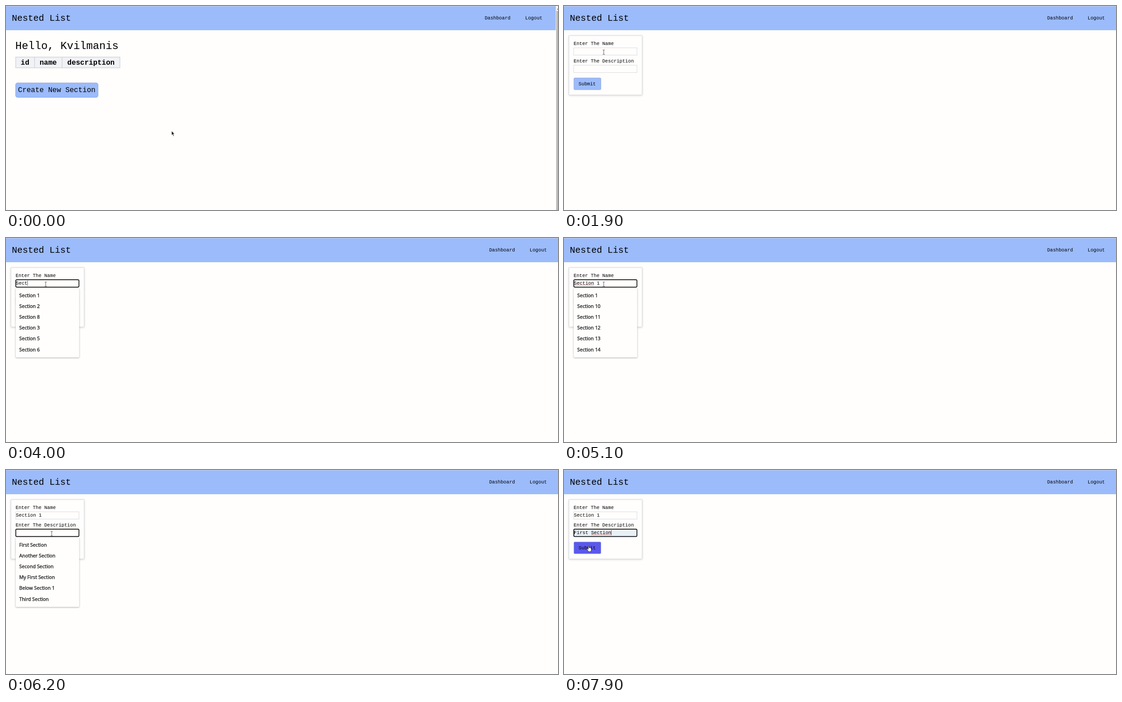
Recreate the animation shown at these times as an HTML page. Size 1232 by 455 pixels, loop 8000 ms.

```html
<!DOCTYPE html>
<html lang="en">
<head>
<meta charset="utf-8">
<title>Nested List</title>
<style>
  html, body { margin: 0; width: 100%; height: 100%; overflow: hidden; background: #fffefd; }
  svg { display: block; width: 100%; height: 100%; }
  text { white-space: pre; }
  .mono { font-family: "Liberation Mono", monospace; }
  .arial { font-family: "Liberation Sans", sans-serif; }
  .ui { font-family: "Noto Sans", sans-serif; }
  .item { font-size: 10.75px; fill: #1c1c1c; stroke: #1c1c1c; stroke-width: .32px; }
  .card { filter: drop-shadow(0 1.3px 2px rgba(0, 0, 0, .16)); }
  .popup { filter: drop-shadow(0 1px 1.4px rgba(0, 0, 0, .34)); }
  .tip { filter: drop-shadow(0 2px 3px rgba(0, 0, 0, .35)); }
</style>
</head>
<body>
<svg id="stage" viewBox="0 0 1232 455"></svg>
<script>
const LOOP = 8000, STEP = 100;
const PAGE = '#fffefd', BLUE = '#9bbbfb', HOVER = '#5a58ec';
const SMALL = 10.67, CHAR = SMALL * 0.6;
const stage = document.getElementById('stage');

const names = ['tavi', 'QVTL', 'Section 1', 'check', 'kel', 'Edvārs Kalmteris'];
const sections = nums => nums.map(n => 'Section ' + n);
const notes = ['First Section', 'Another Section', 'Second Section',
  'My First Section', 'Below Section 1', 'Third Section'];

// Pointer stops: time, x, y, shape. Straight moves between them unless held.
const path = [
  [0, 369.5, 278.5, 'arrow'], [200, 369.5, 278.5, 'arrow'],
  [600, 270, 236, 'arrow'], [800, 200, 203, 'hand'], [1000, 169.5, 191, 'hand'],
  [1200, 169.5, 191, 'arrow'], [1500, 169.5, 191, 'arrow'],
  [1600, 165, 196, 'arrow'], [1800, 108, 118, 'arrow'], [1900, 88.7, 103, 'beam'],
  [5200, 88.7, 103, 'beam'], [5300, 104, 93, 'arrow'], [5400, 126, 84, 'arrow'],
  [5500, 143, 93, 'arrow'], [5600, 146, 99.3, 'arrow'], [5700, 122, 122, 'arrow'],
  [5800, 99.5, 137, 'arrow'], [5900, 99.5, 137, 'arrow'], [6000, 102, 142, 'beam'],
  [7000, 102, 142, 'beam'], [7200, 100, 157, 'beam'], [7400, 97, 168.3, 'beam'],
  [7600, 97, 168.3, 'beam'], [7700, 84, 170, 'arrow'], [7800, 66, 171, 'hand'],
  [7900, 55, 169, 'hand']
];

// Name field content by time.
const typing = [[3500, 1], [3600, 2], [4000, 4], [4100, 5], [4200, 6], [4400, 8], [4700, 9]];

const rect = (x, y, w, h, fill, more = '') =>
  `<rect x="${x}" y="${y}" width="${w}" height="${h}" fill="${fill}" ${more}/>`;
const text = (s, x, y, size, more = '', font = 'mono') =>
  `<text class="${font}" x="${x}" y="${y}" font-size="${size}" ${more}>${s}</text>`;
const box = (x, y, w, h, fill, line, width = 1, r = 0) =>
  rect(x + width / 2, y + width / 2, w - width, h - width, fill,
    `stroke="${line}" stroke-width="${width}" rx="${r}"`);
const inside = (p, x, y, w, h) => p.x >= x && p.x <= x + w && p.y >= y && p.y <= y + h;

function pointerAt(t) {
  let i = path.length - 1;
  while (path[i][0] > t) i--;
  const a = path[i], b = path[i + 1] || a;
  const k = b === a ? 0 : (t - a[0]) / (b[0] - a[0]);
  return { x: a[1] + (b[1] - a[1]) * k, y: a[2] + (b[2] - a[2]) * k, shape: a[3] };
}

const shapes = {
  arrow: `<path d="M0 0V9.8L2.2 7.8L3.9 11.9L5.6 11.2L3.9 7.2H6.9Z" fill="#1b1b1b" stroke="#fff" stroke-width=".8"/>`,
  beam: `<path d="M-2.4 -5H-.8Q0 -5 0 -4.2V4.2Q0 5 -.8 5H-2.4M2.4 -5H.8Q0 -5 0 -4.2M0 4.2Q0 5 .8 5H2.4" fill="none" stroke="#444" stroke-width=".9"/>`,
  hand: `<path d="M-.9 .6Q0 -.5 .9 .6V4.4Q2 3.7 2.7 4.7Q3.8 4.2 4.4 5.2Q5.9 5 5.9 6.6V9Q5.9 10.4 5 11.4V13H-1V11.6L-3.8 7.8Q-4 6.3 -2.5 6.6L-.9 8Z" fill="#fff" stroke="#222" stroke-width=".8"/>`
};
const pointer = p =>
  `<g transform="translate(${p.x.toFixed(1)} ${p.y.toFixed(1)})">${shapes[p.shape]}</g>`;

function header(width, shift) {
  return rect(0, 0, width, 54, BLUE) + rect(0, 0, 1232, 1, '#c3cfe8') +
    text('Nested List', 13, 33, 20) +
    text('Dashboard', 1068.4 + shift, 30.3, SMALL) +
    text('Logout', 1158.8 + shift, 30.3, SMALL);
}

function scrollbar() {
  return rect(1227, 0, 5, 455, '#f4f3f2') + rect(1228, 11, 4, 444, '#bdbbb9') +
    `<path d="M1229.5 8L1232 5V8Z" fill="#777"/>`;
}

function dashboard(t, p) {
  const focus = t >= 1200, hover = inside(p, 21, 171, 185, 33);
  const bold = 'font-weight="700"';
  return header(1227, 0) + scrollbar() +
    text('Hello, Kvilmanis', 20.8, 96, 24) +
    box(21, 113.3, 234, 25.2, '#f0f2f6', '#ccd0d6', 1.3) +
    rect(63, 114, 1.3, 24, '#ccd0d6') + rect(124.6, 114, 1.3, 24, '#ccd0d6') +
    text('id', 32.8, 130.5, 16, bold) + text('name', 75, 130.5, 16, bold) +
    text('description', 136.8, 130.5, 16, bold) +
    box(21, 171, 185, 33.3, hover ? HOVER : BLUE, focus ? '#0c0c14' : '#8b9cc6',
      focus ? 1.5 : 0.8, focus ? 2 : 4.5) +
    text('Create New Section', 26.8, 192.2, 16);
}

function field(y, focus, fill = '#fffefd') {
  return focus ? box(21, y - 0.6, 142.6, 18.2, fill, '#0a0a0a', 1.7, 2.2)
    : box(21.3, y, 142, 17.2, fill, '#d2d2d4', 0.8);
}

const caret = (chars, y) => rect(22 + chars * CHAR, y, 0.8, 11.5, '#222');

function squiggle(from, to, y) {
  let d = '';
  for (let x = from, i = 0; x <= to; x += 1.3, i++)
    d += `${i ? 'L' : 'M'}${x.toFixed(1)} ${y + (i % 2 ? 0.6 : -0.6)}`;
  return `<path d="${d}" fill="none" stroke="#e8494f" stroke-width=".7"/>`;
}

function popup(top, items, marked, fade) {
  const row = 24.1, mid = top + 77.75;
  const scale = fade < 1 ? 0.96 : 1;
  return `<g opacity="${fade}" transform="translate(92.5 ${mid}) scale(${scale}) translate(-92.5 ${-mid})">` +
    rect(21.5, top, 142, 155.5, PAGE, 'rx="2" class="popup"') +
    (marked ? rect(21.5, top + 5, 142, row, '#c5c5c5') : '') +
    items.map((s, i) => text(s, 29.5, top + 21 + i * row, 10.75, '', 'ui item')).join('') + '</g>';
}

function tooltip() {
  return rect(96.3, 113.7, 115.7, 16.5, '#0a0a0a', 'class="tip"') +
    text('Please fill out this field.', 101, 125.4, 9.8, 'fill="#fff"', 'ui');
}

function form(t, p) {
  const onName = t >= 2200 && t < 6200, onNote = t >= 6200;
  const typed = typing.reduce((n, [at, len]) => (t >= at ? len : n), 0);
  const preview = t >= 7200 && t < 7500, filled = t >= 7500;
  const hover = inside(p, 22, 160, 60.5, 27) && t >= 7700;

  let s = header(1232, 10) +
    rect(11, 66, 163.4, 132.4, PAGE, 'rx="1" stroke="#d3d3d8" stroke-width=".9" class="card"') +
    text('Enter The Name', 21.5, 87.2, SMALL) + field(92.8, onName) +
    text('Section 1'.slice(0, typed), 22.1, 104, SMALL) +
    text('Enter The Description', 21.5, 126, SMALL) +
    field(131.7, onNote, preview || filled ? '#e8f0f8' : PAGE);

  if (typed && t < 4800) s += caret(typed, 95);
  if (t >= 4800 && onName) s += squiggle(22.3, 67, 105.4);
  if (preview) s += text('First Section', 22.4, 142.9, 8.89, '', 'arial');
  if (filled) s += text('First Section', 22.1, 143, SMALL) +
    squiggle(60.8, 106, 144.7) + caret(13, 134);

  s += box(21.7, 160, 61, 27.2, hover ? HOVER : BLUE, '#8f9fca', 0.8, 2) +
    text('Submit', 32.6, 176.5, SMALL);

  if (t >= 2300 && t < 5700) {
    const list = t < 3600 ? names : sections(t < 5100 ? [1, 2, 8, 3, 5, 6] : [1, 10, 11, 12, 13, 14]);
    s += popup(111, list, false, t < 5600 ? 1 : 0.17);
  }
  if (t >= 6200 && t < 7700) s += popup(150, notes, t >= 7200, t < 7600 ? 1 : 0.17);
  if (t >= 2700 && t < 3200) s += tooltip();
  return s;
}

let last = -1;
function draw(now) {
  const t = Math.floor((now % LOOP) / STEP) * STEP;
  if (t !== last) {
    last = t;
    const p = pointerAt(t);
    stage.innerHTML = rect(0, 0, 1232, 455, PAGE) +
      (t < 1300 ? dashboard(t, p) : form(t, p)) + pointer(p);
  }
}

const start = performance.now();
function tick() {
  draw(performance.now() - start);
  requestAnimationFrame(tick);
}
tick();
</script>
</body>
</html>
```
